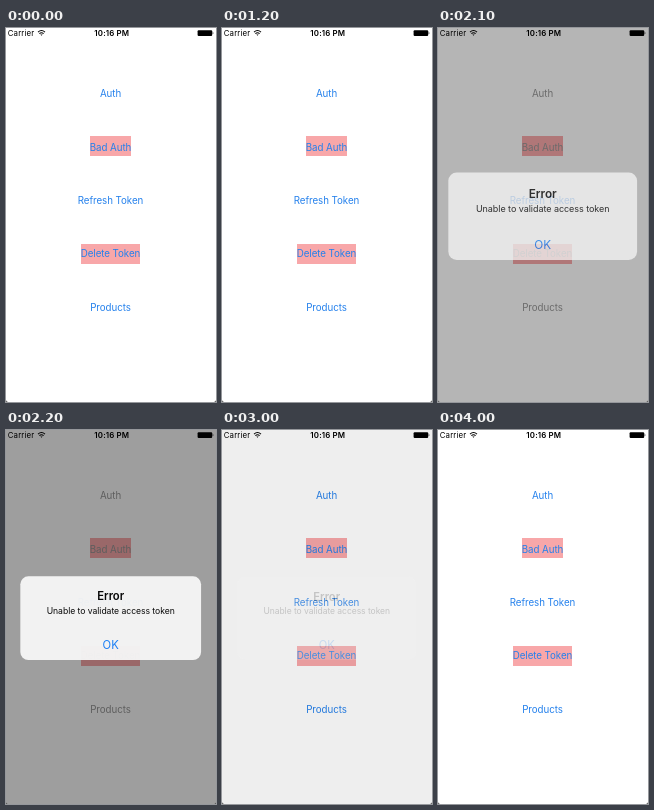
These frames come from a looping animation (210x374 px, 4300 ms). An HTML page:

```html
<!DOCTYPE html>
<html lang="en">
<head>
<meta charset="utf-8">
<title>Access token alert</title>
<style>
  html, body { margin: 0; width: 100%; height: 100%; overflow: hidden; background: #333; }
  svg { display: block; width: 100vw; height: 100vh; font-family: Inter, Roboto, sans-serif; }
  .middle { text-anchor: middle; }
  .status { font-size: 7.87px; letter-spacing: .15px; }
  .button { font-size: 9.75px; letter-spacing: -.06px; fill: #2480ec; }
  .dimmed .tinted { fill: #969696; }
  .strong { font-weight: 600; }
</style>
</head>
<body>
<svg viewBox="0 0 210 374">
  <path d="M0 0H210V371.5Q210 374 207.5 374H2.5Q0 374 0 371.5Z" fill="#fff"/>
  <g class="status">
    <text x="1.7" y="7.8">Carrier</text>
    <text class="middle strong" x="105.8" y="7.8">10:16 PM</text>
    <g fill="none" stroke="#000" stroke-width="1.1">
      <path d="M32 4.1Q35.5 1 39 4.1M33.4 5.7Q35.5 3.8 37.6 5.7"/>
      <path d="M34.4 6.6H36.6L35.5 7.8Z" fill="#000" stroke="none"/>
    </g>
    <rect x="191.6" y="2.2" width="14.6" height="5.8" rx="1"/>
    <path d="M206.7 4Q208.4 5.1 206.7 6.2Z"/>
  </g>
  <g id="menu" class="middle"></g>
  <path id="shade" d="M0 0H210V371.5Q210 374 207.5 374H2.5Q0 374 0 371.5Z"/>
  <g id="alert" class="middle">
    <rect x="-89.5" y="-41.5" width="179" height="83" rx="8" fill="#f7f7f7"/>
    <text class="strong" y="-17.6" font-size="11.16">Error</text>
    <text y="-4.1" font-size="8.53" letter-spacing="-.04">Unable to validate access token</text>
    <text y="30.8" font-size="11.16" fill="#147efb">OK</text>
  </g>
</svg>
<script>
const LOOP = 4300, OPEN = 1984, CLOSE = 2872, FADE = 175;
const [menu, shade, alertBox] = ['menu', 'shade', 'alert'].map(id => document.getElementById(id));

const buttons = [
  { label: 'Auth' },
  { label: 'Bad Auth', box: { x: 84, y: 108, width: 41 } },
  { label: 'Refresh Token', keepsTint: true },
  { label: 'Delete Token', box: { x: 75, y: 216, width: 59 } },
  { label: 'Products' }
];
menu.innerHTML = buttons.map(({ label, box, keepsTint }, i) => {
  const back = box
    ? `<rect x="${box.x}" y="${box.y}" width="${box.width}" height="20" fill="#f8a7a9"/>` : '';
  return `${back}<text class="button ${keepsTint ? '' : 'tinted'}" x="104.5" y="${69.4 + i * 53.35}">${label}</text>`;
}).join('');

// Critically damped spring: share of the distance still to travel
const springLeft = ms => {
  const x = Math.max(0, ms) * .022;
  return (1 + x) * Math.exp(-x);
};
const smooth = u => {
  u = Math.min(1, Math.max(0, u));
  return u * u * (3 - 2 * u);
};

function draw(now) {
  const t = now % LOOP;
  const left = springLeft(t - OPEN);
  const shown = (1 - left) * (1 - smooth((t - CLOSE) / FADE));
  shade.setAttribute('opacity', .4 * shown);
  alertBox.setAttribute('opacity', shown);
  alertBox.setAttribute('transform', `translate(104.7 188.2) scale(${1 + .2 * left})`);
  menu.classList.toggle('dimmed', t >= 2000 && t < 2950);
  requestAnimationFrame(draw);
}
requestAnimationFrame(draw);
</script>
</body>
</html>
```
